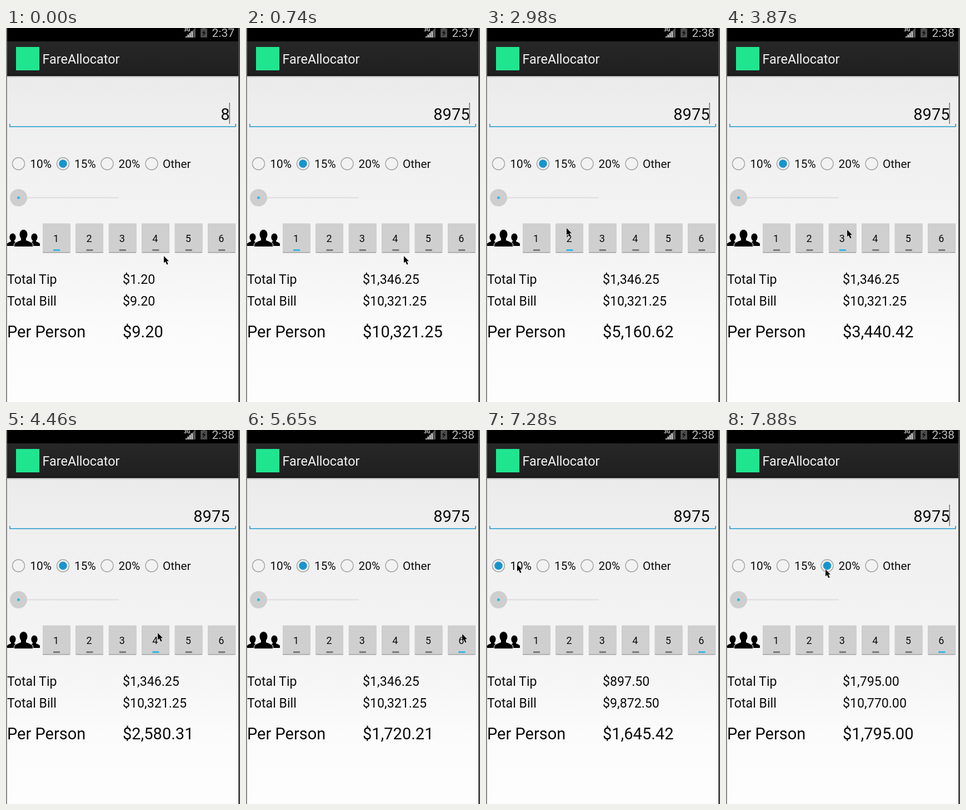
These frames come from a looping animation (421x671 px, 8 s). An HTML page:

```html
<!DOCTYPE html>
<html lang="en">
<head>
<meta charset="utf-8">
<title>Tip screen</title>
<style>
  html, body { margin: 0; width: 100%; height: 100%; overflow: hidden; background: #fcfcfc; }
  svg { display: block; width: 421px; height: 671px; }
  text { font-family: Roboto, "Open Sans", sans-serif; fill: #0c0c0c; white-space: pre; }
  .small { font-size: 18px; text-anchor: middle; }
  .radio { font-size: 20.8px; }
  .medium { font-size: 23.2px; }
  .large { font-size: 29px; }
</style>
</head>
<body>
<svg viewBox="0 0 421 671">
  <defs>
    <linearGradient id="page" x1="0" y1="0" x2="0" y2="1">
      <stop offset="0" stop-color="#ebebeb"/>
      <stop offset=".2" stop-color="#f0f0f0"/>
      <stop offset=".6" stop-color="#f5f5f5"/>
      <stop offset=".78" stop-color="#fbfbfb"/>
      <stop offset="1" stop-color="#fdfdfd"/>
    </linearGradient>
    <linearGradient id="bar" x1="0" y1="0" x2="0" y2="1">
      <stop offset="0" stop-color="#272727"/>
      <stop offset="1" stop-color="#1f1f1f"/>
    </linearGradient>
    <linearGradient id="shade" x1="0" y1="0" x2="0" y2="1">
      <stop offset="0" stop-color="#000" stop-opacity=".35"/>
      <stop offset="1" stop-color="#000" stop-opacity="0"/>
    </linearGradient>
  </defs>

  <!-- Window and bars -->
  <rect y="86" width="421" height="585" fill="url(#page)"/>
  <rect width="421" height="24" fill="#000"/>
  <rect y="24" width="421" height="62" fill="url(#bar)"/>
  <rect y="84" width="421" height="2" fill="#111"/>
  <rect y="86" width="421" height="3" fill="url(#shade)"/>
  <rect width="2" height="671" fill="#8c8c8c"/>
  <rect x="418" width="3" height="671" fill="#47474a"/>

  <!-- Status icons -->
  <text x="320" y="6" font-size="9" font-weight="700" style="fill:#d0d0d0">3G</text>
  <path d="M323 17L341 -1V17Z" fill="#555"/>
  <path d="M323 17v-2h3v-3h3v-3h3v-3h4V17Z" fill="#c4c4c4"/>
  <path d="M326 8V17M329.500 8V17M333 6V17" stroke="#222" stroke-width=".8"/>
  <path d="M350 1h3v-2h6v2h3V17H350Z" fill="#4c4c4c"/>
  <path d="M358 3l-5 6h3l-2 6 5-7h-3Z" fill="#000"/>
  <text id="clock" x="370.500" y="15.500" font-size="21" style="fill:#bdbdbd"></text>

  <rect x="18" y="34" width="42" height="42" fill="#1fe58f"/>
  <text x="65.500" y="64" font-size="23.4" style="fill:#f3f3f3">FareAllocator</text>

  <!-- Amount field -->
  <path d="M7 172V177H413V172" fill="none" stroke="#1e98ca" stroke-width="1.600"/>
  <text id="amount" class="large" x="402.500" y="164.500" text-anchor="end"></text>
  <rect id="caret" x="401.500" y="134" width="1.500" height="38" fill="#707070"/>

  <g id="radios"></g>

  <!-- Slider -->
  <path d="M22 304.500H203" stroke="#dedede" stroke-width="2"/>
  <circle cx="22.500" cy="304.500" r="15.500" fill="#cecece"/>
  <circle cx="22.500" cy="304.500" r="2.500" fill="#33b5e5"/>

  <!-- People -->
  <g id="people">
    <g id="side">
      <ellipse cx="12" cy="375.500" rx="5.600" ry="7"/>
      <path d="M2 391V387Q3 385 9 383V379H15V383L22 386V391Z"/>
    </g>
    <use href="#side" transform="matrix(-1 0 0 1 63 0)"/>
    <path d="M15 392V388Q16 384.500 27 381V375H36V381Q47 384.500 48 388V392Z" stroke="#f4f4f4" stroke-width="2" paint-order="stroke"/>
    <ellipse cx="31.500" cy="370.500" rx="7" ry="8.700"/>
  </g>

  <g id="buttons"></g>

  <text class="medium" x="2" y="459">Total Tip</text>
  <text class="medium" x="2" y="498">Total Bill</text>
  <text class="large" x="2" y="555">Per Person</text>
  <text id="tip" class="medium" x="210" y="459"></text>
  <text id="bill" class="medium" x="210" y="498"></text>
  <text id="share" class="large" x="210" y="555"></text>

  <path id="mouse" d="M0 0V12.500L2.800 10 5.300 15.500 7.600 14.500 5.200 9.200H9Z" fill="#000" stroke="#fff" stroke-width="1" paint-order="stroke"/>
</svg>

<script>
const LOOP = 8000;
const $ = id => document.getElementById(id);

// Hard changes: [time, value]
const typed = [[0, '8'], [140, '89'], [440, '897'], [740, '8975']];
const clock = [[0, '2:37'], [1485, '2:38']];
const people = [[0, 1], [2980, 2], [3720, 3], [4460, 4], [5050, 5], [5650, 6]];
const rates = [[0, 15], [6840, 10], [7880, 20]];
const blinks = [1337, 1782, 2230, 2680, 3273, 3720, 4166, 4611, 5200, 5798, 6245, 6690, 7137, 7582];

// Pointer moves: first step, last step, number of steps, end point
const start = [284, 409];
const moves = [
  [1040, 1930, 7, 144.5, 359],
  [3127, 3420, 3, 208, 362],
  [3869, 4314, 4, 273, 364],
  [4611, 4760, 2, 330, 365],
  [5200, 5350, 2, 389, 366],
  [5798, 6690, 7, 13, 238],
  [6988, 7731, 6, 179, 250]
];

const options = [['10%', 22.5, 43.3], ['15%', 102.5, 123], ['20%', 182, 202.5], ['Other', 262, 282]];
$('radios').innerHTML = options.map(([label, cx, x]) => `
  <circle cx="${cx}" cy="243.5" r="11" fill="#f2f2f2" stroke="#a2a2a2" stroke-width="1.4"/>
  <circle class="dot" cx="${cx}" cy="243.5" r="7.2" fill="#1694cc" stroke="#5fb2d6" stroke-width=".8"/>
  <text class="radio" x="${x}" y="251">${label}</text>`).join('');

$('buttons').innerHTML = [1, 2, 3, 4, 5, 6].map(n => {
  const x = 66 + (n - 1) * 59.45;
  return `
  <rect x="${x}" y="351" width="49.5" height="52.5" rx="1" fill="#a0a0a0"/>
  <rect x="${x}" y="350.5" width="49.5" height="51.5" rx="1" fill="#cfcfcf"/>
  <text class="small" x="${x + 24}" y="383.5">${n}</text>
  <rect class="mark" x="${x + 19}" y="397" width="12" height="3"/>`;
}).join('');

const dots = document.querySelectorAll('.dot');
const marks = document.querySelectorAll('.mark');

const at = (list, t) => list.filter(([from]) => from <= t).pop()[1];
const ease = p => p * p * (3 - 2 * p);

// Nudged down so that exact half cents round down
const money = v => '$' + (v - 1e-6).toLocaleString('en-US',
  { minimumFractionDigits: 2, maximumFractionDigits: 2 });

function pointer(t) {
  let [x, y] = start;
  for (const [from, to, steps, endX, endY] of moves) {
    if (t < from) break;
    const gap = (to - from) / (steps - 1);
    const p = ease(Math.min(steps, Math.floor((t - from) / gap + 1e-6) + 1) / steps);
    x += (endX - x) * p;
    y += (endY - y) * p;
  }
  return [x, y];
}

function draw(t) {
  const amount = at(typed, t), rate = at(rates, t), count = at(people, t);
  const tip = amount * rate / 100, bill = +amount + tip;
  $('clock').textContent = at(clock, t);
  $('amount').textContent = amount;
  $('tip').textContent = money(tip);
  $('bill').textContent = money(bill);
  $('share').textContent = money(bill / count);
  const lit = blinks.filter(b => b <= t).length % 2 === 0;
  $('caret').setAttribute('visibility', lit ? 'visible' : 'hidden');
  dots.forEach((dot, i) =>
    dot.setAttribute('visibility', parseInt(options[i][0]) === rate ? 'visible' : 'hidden'));
  marks.forEach((mark, i) => mark.setAttribute('fill', i + 1 === count ? '#33b5e5' : '#7a7a7a'));
  $('mouse').setAttribute('transform', `translate(${pointer(t).map(Math.round)})`);
}

function tick() {
  draw(performance.now() % LOOP);
  requestAnimationFrame(tick);
}
tick();
</script>
</body>
</html>
```
